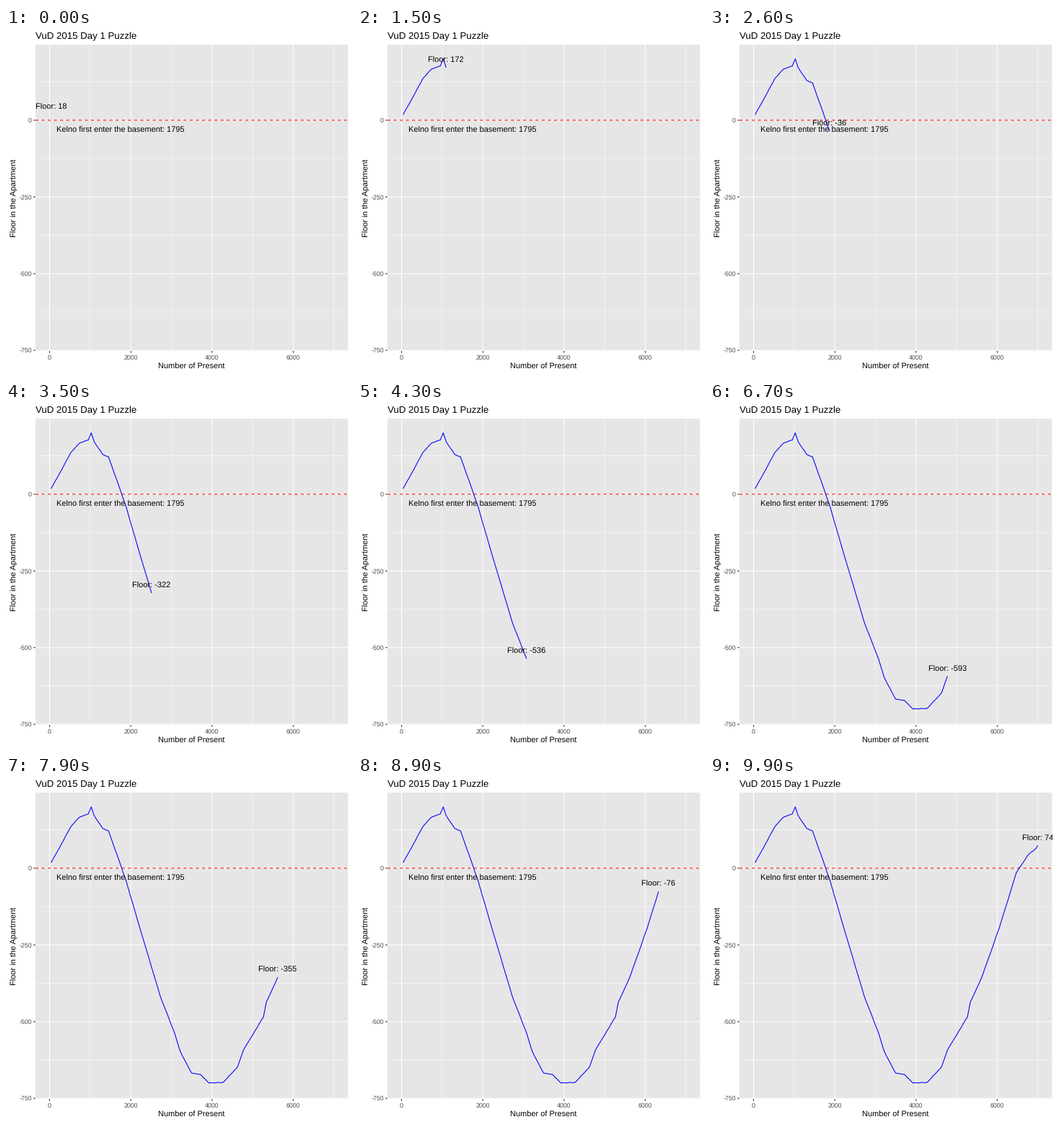
Write a matplotlib script that moves like this. It is 480 px wide and 480 px high and loops after 10000 ms.

```python
import numpy as np
import matplotlib.pyplot as plt
from matplotlib.animation import FuncAnimation
from matplotlib.lines import Line2D
from matplotlib.transforms import offset_copy

SIZE, DPI = 480, 72          # at 72 dpi one point is one pixel
FRAMES, PRESENTS = 100, 7000
LEFT, RIGHT, TOP, BOTTOM = 40.8, 474.5, 23, 448
XLIM, YLIM = (-349, 7350), (-752, 246.5)

plt.rcParams.update({
    "font.family": "Liberation Sans",
    "font.size": 11,
    "text.hinting": "none",
    "path.simplify": False,
})

# Bends of the walk: (animation step, floor)
BENDS = [
    (0, 18), (7, 137), (10, 168), (13, 177), (14, 200), (15, 172),
    (18, 130), (20, 123), (26, -36), (30, -164), (38, -416), (43, -536),
    (45, -597), (49, -668), (52, -671), (55, -700), (60, -697), (65, -647),
    (67, -592), (74, -484), (75, -436), (79, -355), (85, -196), (91, -15),
    (95, 43), (99, 74),
]

# Presents handed out and floor reached at each step
steps = np.arange(FRAMES)
stride = (PRESENTS - 1) / (FRAMES - 1)
present = np.minimum(1 + stride * (steps + 0.5), PRESENTS).astype(int)
floor = np.rint(np.interp(steps, *zip(*BENDS))).astype(int)
# Every present moves one floor, so both counts share their parity
floor -= (floor + present) % 2


def px(value):
    return LEFT + (value - XLIM[0]) / (XLIM[1] - XLIM[0]) * (RIGHT - LEFT)


def py(value):
    return BOTTOM - (value - YLIM[0]) / (YLIM[1] - YLIM[0]) * (BOTTOM - TOP)


def put(x, y, text, **style):
    """Text with its baseline at pixel (x, y), counted from the top left."""
    style = {"va": "baseline", "ha": "center", **style}
    fig.text(x / SIZE, 1 - y / SIZE, text, **style)


def tick(x, y, dx, dy):
    """Tick mark from pixel (x, y)."""
    fig.add_artist(Line2D(
        [x / SIZE, (x + dx) / SIZE], [1 - y / SIZE, 1 - (y + dy) / SIZE],
        color="#333333", lw=1.07, solid_capstyle="butt", snap=False))


fig = plt.figure(figsize=(SIZE / DPI, SIZE / DPI), dpi=DPI, facecolor="white")
ax = fig.add_axes(
    [LEFT / SIZE, 1 - BOTTOM / SIZE, (RIGHT - LEFT) / SIZE, (BOTTOM - TOP) / SIZE],
    facecolor="#E6E6E6", xlim=XLIM, ylim=YLIM)
ax.patch.set_snap(False)
ax.spines[:].set_visible(False)
ax.set_axisbelow(True)

# Grid, ticks and their labels
xticks, yticks = range(0, 6001, 2000), range(-750, 1, 250)
ax.set_xticks(xticks)
ax.set_yticks(yticks)
ax.set_xticks(range(1000, 7001, 2000), minor=True)
ax.set_yticks(range(-625, 126, 250), minor=True)
ax.tick_params(which="both", length=0, labelbottom=False, labelleft=False)
ax.grid(which="major", color="white", lw=1.07, snap=False)
ax.grid(which="minor", color="white", lw=0.53, snap=False)

tick_text = dict(size=8.8, color="#4D4D4D")
for v in xticks:
    tick(px(v), BOTTOM, 0, 2.75)
    put(px(v), 460, str(v), **tick_text)
for v in yticks:
    tick(LEFT, py(v), -2.75, 0)
    put(36, py(v) + 3.2, str(v), ha="right", **tick_text)

put(40.6, 15, "VuD 2015 Day 1 Puzzle", ha="left", size=13.2)
put(257.7, 473, "Number of Present")
put(14.3, 236, "Floor in the Apartment", rotation=90, rotation_mode="anchor")

# Ground floor, walk and moving label
ax.axhline(0, color="red", lw=1.07, ls=(0, (4, 4)), dash_capstyle="butt",
           snap=False)
put(158.5, 145, "Kelno first enter the basement: 1795")
line, = ax.plot([], [], color="blue", lw=1.07, solid_capstyle="butt",
                solid_joinstyle="round", zorder=2.5)
above = offset_copy(ax.transData, fig, x=-0.2, y=6.9, units="points")
label = ax.text(0, 0, "", ha="center", va="baseline", transform=above,
                clip_on=True, zorder=4)


def draw(i):
    line.set_data(present[:i + 1], floor[:i + 1])
    label.set_position((present[i], floor[i]))
    label.set_text(f"Floor: {floor[i]}")
    return line, label


anim = FuncAnimation(fig, draw, frames=FRAMES, interval=100, repeat=True,
                     repeat_delay=0)
plt.show()
```
